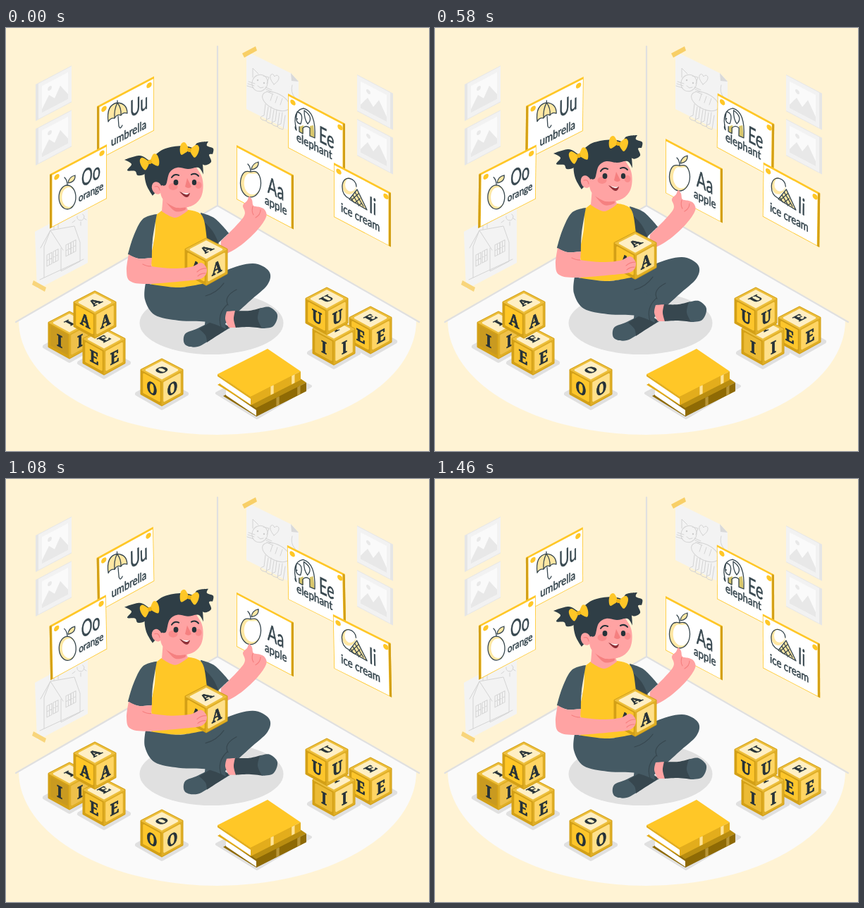
Recreate the animation shown at these times as an HTML page. Size 600 px wide and 600 px high, loop 1500 ms.

```html
<!DOCTYPE html>
<html lang="en">
<head>
<meta charset="utf-8">
<title>Learning letters</title>
<style>
html, body { margin: 0; width: 100%; height: 100%; overflow: hidden; background: #fff3d4; }
svg { display: block; width: 100vw; height: 100vh; }
.label { font-family: Lato, "Open Sans", sans-serif; fill: #37474f; stroke: #37474f; stroke-width: .6; }
.slab { font-family: "Noto Serif", "Liberation Serif", serif; font-weight: 800; text-anchor: middle;
  fill: #263238; stroke: #263238; stroke-width: .9; }
.ink, .faint, .fold { fill: none; stroke-linecap: round; stroke-linejoin: round; }
.ink { stroke: #37474f; stroke-width: 1.3; }
.faint { stroke: #d4d4d4; stroke-width: 1; }
.fold { stroke: #f58080; stroke-width: 1.2; }
</style>
</head>
<body>
<svg id="stage" viewBox="0 0 600 600" xmlns="http://www.w3.org/2000/svg"></svg>
<script>
const YELLOW = '#ffc727', GOLD = '#d3a017', CREAM = '#ffe7a3', NAVY = '#455a64', DARK = '#37474f',
      HAIR = '#2f3e46', SKIN = '#ffa3a3', BLUSH = '#f58080', SHADE = '#e0e0e0', PAPER = '#f3f3f3';
const SLOPE = 0.525, LOOP = 1500;

const path = (d, fill, extra = '') => `<path d="${d}" fill="${fill}" ${extra}/>`;
const line = (d, cls = 'ink', extra = '') => `<path d="${d}" class="${cls}" ${extra}/>`;
const oval = (x, y, rx, ry, fill, turn = 0) =>
  `<ellipse rx="${rx}" ry="${ry}" fill="${fill}" transform="translate(${x} ${y}) rotate(${turn})"/>`;
const dot = (x, y, r, fill) => oval(x, y, r, r, fill);
const rect = (x, y, w, h, fill) => `<rect x="${x}" y="${y}" width="${w}" height="${h}" fill="${fill}"/>`;
const poly = (points, fill, round = 0) =>
  `<polygon points="${points.join(' ')}" fill="${fill}" stroke="${fill}" stroke-width="${round}" stroke-linejoin="round"/>`;
const add = (...v) => [0, 1].map(i => v.reduce((sum, p) => sum + p[i], 0));
const range = (n, f) => Array.from({ length: n }, (_, i) => f(i)).join('');
// side: -1 for the left wall, 1 for the right wall
const wall = (x, y, side, inner) => `<g transform="matrix(1 ${side * SLOPE} 0 1 ${x} ${y})">${inner}</g>`;

// closed smooth curve through points; "!" marks a corner
function smooth(text) {
  const pts = text.split(' ').map(s => ({ p: s.replace('!', '').split(',').map(Number), corner: s.endsWith('!') }));
  const n = pts.length, at = i => pts[(i + n) % n];
  const handle = (i, dir) => at(i).p.map((v, k) =>
    (v + (at(i).corner ? 0 : dir * (at(i + 1).p[k] - at(i - 1).p[k]) / 6)).toFixed(1));
  return 'M' + pts[0].p + pts.map((_, i) => `C${handle(i, 1)} ${handle(i + 1, -1)} ${at(i + 1).p}`).join('') + 'Z';
}
const blob = (text, fill, extra) => path(smooth(text), fill, extra);

function label(text, x, y, side, size, narrow) {
  return `<text class="label" font-size="${size}" transform="matrix(${narrow} ${side * SLOPE * narrow} 0 1 ${x} ${y})">${text}</text>`;
}
const initials = (text, x, y, side) => label(text, x, y, side, 32, 0.62);
const word = (text, x, y, side, size = 17) => label(text, x, y, side, size, 0.78);

function card(id, x, y, side, pins, inner) {
  const left = side < 0;
  const board = rect(0, 0, 81, 77, YELLOW) + rect(left ? 0 : 78, 1, 3, 76, GOLD) +
    rect(left ? 3.5 : 0.8, 3, 76.7, 73.2, '#fff') +
    (pins ? dot(left ? 10 : 7, 9, 3.7, YELLOW) + dot(74, 9, 3.7, YELLOW) : '');
  return `<g id="${id}">${wall(x, y, side, board)}${inner}</g>`;
}

function photo(x, y, side) {
  const o = side < 0 ? 4 : 0;
  return wall(x, y, side, rect(0, 0, 51, 52, '#e6e6e6') + rect(o, 1, 47, 50, '#f2f2f2') +
    rect(o + 5, 7, 37, 38, '#fafafa') +
    path(`M${o + 5} 45V40l10-15 8 9 8-14 11 18v7Z`, '#e8e8e8') + dot(o + 16, 16, 3, '#e8e8e8'));
}

function face(points, edge, fill) {
  const mid = [0, 1].map(k => points.reduce((s, p) => s + p[k], 0) / 4);
  const inner = points.map(p => p.map((v, k) => mid[k] + (v - mid[k]) * 0.76));
  return poly(points, edge, 1) + poly(inner, fill, 2.5);
}

// x, y: the corner where the three visible faces meet
function cube(x, y, ch, left = '#fdc62c', right = '#ffe08a') {
  const H = 34, near = [x, y], west = [x - 29, y - 16], east = [x + 29, y - 16], far = [x, y - 31];
  const low = p => add(p, [0, H]);
  const glyph = (matrix, gx, gy, size) =>
    `<text class="slab" font-size="${size}" y="${size * 0.36}" transform="matrix(${matrix} ${gx} ${gy})">${ch}</text>`;
  return poly([west, far, east, low(east), low(near), low(west)], GOLD, 3) +
    face([west, near, low(near), low(west)], GOLD, left) +
    face([near, east, low(east), low(near)], '#dfae26', right) +
    face([west, far, east, near], '#edbf3c', '#ffefc4') +
    glyph('.82 .43 0 1', x - 14, y + 10, 23) + glyph('.82 -.43 0 1', x + 15, y + 10, 23) +
    glyph('.85 -.45 .7 .37', x, y - 16, 20);
}
const cubeShade = (x, y) => poly([[x - 35, y + 18], [x, y - 1], [x + 35, y + 18], [x, y + 38]], SHADE, 6);

function room() {
  return rect(0, 0, 600, 600, '#fff3d4') + path('M300 252L18 415A282 162 0 0 0 582 415Z', '#fafafa') +
    line('M300 26V252M14 417L300 252 586 417', 'faint', `style="stroke:${SHADE};stroke-width:2.2"`) +
    [0, 63].map(dy => photo(42, 80 + dy, -1) + photo(498, 66 + dy, 1)).join('') + catSketch() + houseSketch();
}

function catSketch() {
  const hoop = (x, y, rx, ry, turn) => `<ellipse class="faint" rx="${rx}" ry="${ry}" transform="translate(${x} ${y}) rotate(${turn})"/>`;
  return path('M341 33L404 64 415 76V152L341 115Z', PAPER) + path('M404 64L415 76 405 75Z', '#d9d9d9') +
    hoop(360, 78, 11, 12, 25) + hoop(383, 104, 21, 11, 27) +
    range(4, i => line(`M${368 + i * 8} ${108 + i * 4}l-2 16q-8 2 -3 6l6 2 3-20`, 'faint')) +
    range(3, i => line(`M${378 + i * 7} ${94 + i * 3}l-3 9M${353 - i} ${79 + i * 3}l-9 -3M${368 + i} ${84 + i * 3}l9 4`, 'faint')) +
    line('M350 70V57l8 8M365 68l8 2 -3 9M357 82l4 3 4-1M402 110q12 0 8-11 -7-8 -4-18M380 80q-8-10 -4-14 3-2 5 3 3-4 6 0 1 6-7 11', 'faint') +
    dot(357, 74, 1.2, '#ccc') + dot(366, 78, 1.2, '#ccc') + path('M335 36L354 26 356 32 338 42Z', '#f8cf67');
}

function houseSketch() {
  const pane = x => line(`M${x} 0h7v16h-7ZM${x + 3.5} 0v16M${x} 8h7`, 'faint');
  return path('M41 289L116 248V333L44 371Z', PAPER) +
    line('M54 354V310L63 287 97 281 105 304V331L78 345V312M49 312L63 287 81 315M68 286V276L74 273V284M48 357L110 328', 'faint') +
    wall(58, 322, -1, [0, 9, 27, 34].map(pane).join('')) +
    line('M101 267A5 5 0 1 0 109 264M98 273l-4 3M106 275v5M111 270l3 2', 'faint') +
    path('M39 358L57 368 55 374 37 364Z', '#f8d57c');
}

// dent pushes the top of the outline inwards
function fruit(x, y, rx, ry, dent) {
  const ring = (cx, k) => smooth(Array.from({ length: 18 }, (_, i) => {
    const a = i / 18 * 2 * Math.PI, c = Math.cos(a);
    return [cx + k * rx * Math.sin(a), y - k * ry * (c - dent * Math.max(0, c) ** 9)].map(v => v.toFixed(1)).join();
  }).join(' '));
  const top = y - ry * (1 - dent);
  return path(ring(x, 1), CREAM) + path(ring(x + rx * 0.18, 0.82), '#fff') + line(ring(x, 1)) +
    path(`M${x + 1} ${top - 3}q1-9 10-11 1 9-10 11`, CREAM, 'class="leaf" stroke="#37474f" stroke-width="1.2"') +
    line(`M${x} ${top}q0-7 -4-11`);
}

function umbrella() {
  const dome = 'M145 133Q142 109 158 106 172 107 172 121q-6-2 -9 3 -5-3 -9 4 -6-1 -9 5Z';
  return path(dome, CREAM) + line(dome + 'M158 106v-3M158 106q-5 10 -4 22M158 106q6 8 5 18M159 125l1 14q2 6 5-1');
}

function elephant() {
  return path('M431 139V153L438 156 436 138ZM416 140L422 138V150L416 147Z', '#d8c66b') +
    line('M412 145Q405 117 422 114 440 119 438 156l-7-3V142q-5-5 -10 0v8l-5-3V140M413 119q10 2 5 17 -9 -1 -5-17M423 117q14 10 5 19 -5 -6 -5-19M412 145q-3-3 -1-7') +
    dot(413, 129, 1, DARK);
}

function iceCream() {
  return oval(487, 224, 10, 12, CREAM) + oval(489, 222, 8, 10, '#fff') + path('M498 229L487 243 512 258Z', CREAM) +
    line('M487 242q-11-5 -10-19c2-16 20-10 20 2M498 229L487 243 512 258Z') +
    range(3, i => line(`M${490 + i * 5} ${244 + i * 4}l${10 - i * 3} ${-9 + i * 3}M${495 - i * 3} ${233 + i * 4}l${12 - i * 4} ${20 - i * 7}`));
}

function signs() {
  return card('uu', 129, 111, -1, true, umbrella() + initials('Uu', 176, 127, -1) + word('umbrella', 149, 168, -1)) +
    card('oo', 62, 207.5, -1, true, fruit(87, 240, 12, 17, 0) + initials('Oo', 107, 226, -1) + word('orange', 103, 247, -1, 15)) +
    card('ee', 400, 93, 1, true, elephant() + initials('Ee', 444, 161, 1) + word('elephant', 412, 160, 1)) +
    card('ii', 465, 191, 1, true, iceCream() + initials('Ii', 515, 261, 1) + word('ice cream', 475, 260, 1));
}
const appleSign = () => card('aa', 327, 166, 1, false,
  fruit(347, 220, 14.5, 20, 0.2) + initials('Aa', 371, 233, 1) + word('apple', 367, 249, 1));

function bow(x, y, turn) {
  const lobe = blob('0,0! -8,-9 -13,-6 -13,3 -9,9', YELLOW);
  return `<g transform="translate(${x} ${y}) rotate(${turn})">${lobe}<g transform="scale(-1 1)">${lobe}</g>${dot(0, 0, 3, '#f0b414')}</g>`;
}

function legs() {
  return blob('276,366! 312,344 350,334 373,345 371,364 345,388 306,424! 280,438! 285,395!', NAVY) +
    blob('300,412! 272,426 254,434 254,449 272,452 295,439 318,425!', NAVY) +
    blob('292,416! 318,424! 285,446! 283,436 274,427!', DARK) +
    blob('198,362! 197,385 211,407 245,415 285,417 312,427! 310,408 315,393! 297,384! 290,360! 245,368', NAVY) +
    line('M283 380q16-4 26-18M315 393q-7-12 12-22M305 424q-6-18 9-32', 'ink', 'style="stroke-width:1.2"') +
    blob('313,402! 326,401! 326,425! 316,425! 311,413', SKIN) +
    blob('325,401! 345,401 362,397! 364,426! 345,424 326,425! 323,413', DARK) +
    blob('360,398! 374,396 385,407 379,423 363,426! 357,412', NAVY);
}

function torso() {
  return blob('276,262! 296,270 316,291! 300,306! 282,304!', NAVY) + blob('278,272! 293,288 302,306! 284,303!', DARK) +
    blob('221,259! 240,268 258,258! 278,266 285,300 289,350! 282,362 245,368 206,365! 207,345 205,325! 211,295 212,266!', YELLOW) +
    blob('223,236! 254,246! 258,259! 240,269 221,260!', SKIN) + blob('227,247! 242,255 254,252! 254,258 240,260', BLUSH) +
    blob('214,264! 194,271 181,295 173,321! 188,327 207,326! 208,300', NAVY);
}

function farArm() {
  return blob('305,302! 337,268 336,252 342,245 345,239 349,244 351,252 360,254 367,258 369,268 357,286 336,306 313,320 304,318!', SKIN) +
    line('M350 253q-2 8 1 12M361 258q0 7 -7 11', 'fold');
}

function nearArm() {
  return blob('174,321! 171,344 176,359 200,363 252,359 278,355 285,343 277,333 262,339 235,341 206,338! 207,326! 188,327', SKIN) +
    line('M284 341q-8 0 -13 5M283 348q-7 0 -11 4M206 338q-7 0 -12-3', 'fold');
}

function head() {
  return blob('205,190! 190,181 168,187! 178,193 172,202 183,203 187,209 198,206', HAIR) +
    blob('267,178! 270,164 287,161! 285,167 294,171 293,179! 288,180 291,190 280,194', HAIR) +
    blob('222,200! 264,190! 278,212 278,236 266,251 244,255 226,246 219,232', SKIN) +
    blob('208,238! 199,222 197,203 206,186 226,171 258,168 276,181 280,208! 273,198 258,200 243,198 232,205 227,222 221,223!', HAIR) +
    oval(214, 227, 7, 9, SKIN, -20) + line('M211 225q6-2 7 5', 'fold') +
    oval(237, 225, 6.5, 5, '#f98c8c') + oval(273, 223, 4.5, 5, '#f98c8c') +
    oval(241, 219, 3.4, 4, '#263238') + oval(267, 219, 3.2, 4, '#263238') +
    line('M235 212q4-6 10-3M263 208q6-3 10 2', 'ink', 'style="stroke:#263238;stroke-width:2"') +
    path('M257 213l6 12q-4 4 -9 0Z', BLUSH) +
    path('M246 232q7 4 15 2 -3 13 -15-2', '#8f3037') + path('M249 233q6 2 11 1 -4 5 -11-1', '#fff') +
    bow(204, 190, -18) + bow(260, 173, 12);
}

// x, y: west corner of the cover
function book(x, y, cover, spine, band) {
  const west = [x, y], along = [71, -36], across = [47, 32], south = add(west, across), down = h => [0, h];
  const strip = (from, to) => {
    const p = k => add(south, along.map(v => v * k));
    return [p(from), p(to), add(p(to), down(12)), add(p(from), down(12))];
  };
  return poly([add(west, down(15)), add(west, along, down(15)), add(south, along, down(12)), add(south, down(12))], spine) +
    poly([add(west, [4, 3]), south, add(south, down(11)), add(west, [4, 14])], '#fff') +
    poly([west, add(west, along), add(south, along), south], cover) +
    poly([west, south, add(south, down(3)), add(west, down(3))], spine) + poly(strip(0, 1), spine) +
    [0.4, 0.82].map(k => poly(strip(k, k + 0.06), band)).join('');
}

function toys() {
  const warm = '#ffd564';
  const cubes = [[90, 434, 'I', '#c99a20', '#eec04a'], [139, 457, 'E', '#f7c332', warm], [126, 405, 'A', YELLOW, warm],
    [221, 501, 'O'], [517, 427, 'E', '#fdc62c', warm], [465, 443, 'I', '#ecbb35'], [455, 400, 'U', '#fdc62c', warm]];
  const onFloor = cubes.filter(c => c[1] > 406);
  return onFloor.map(c => cubeShade(c[0], c[1])).join('') + cubes.map(c => cube(...c)).join('') +
    poly([[299, 518], [372, 480], [432, 508], [356, 553]], SHADE, 4) +
    book(308, 507, '#b98d10', '#8e6a05', '#b99637') + book(300, 491, YELLOW, '#e3ad1c', '#ffe397');
}

const stage = document.getElementById('stage');
stage.innerHTML = room() + signs() + oval(291.5, 418.5, 102, 44.5, SHADE) +
  `<g id="lift">${appleSign()}${farArm()}${torso()}${legs()}${head()}${cube(284, 330, 'A')}${nearArm()}</g>` + toys();

const part = id => document.getElementById(id);
const lift = part('lift');
const swings = [['uu', 170, 128], ['oo', 103, 226], ['ee', 440, 153], ['ii', 506, 251]]
  .map(([id, x, y]) => ({ el: part(id), x, y }));

function draw(time) {
  const phase = (time % LOOP) / LOOP * 2 * Math.PI;
  const rise = 4.9 * (1 - Math.cos(phase + 0.1));
  const sway = 1.15 * Math.sin(phase);
  lift.setAttribute('transform', `translate(0 ${-rise.toFixed(3)})`);
  for (const s of swings) s.el.setAttribute('transform', `rotate(${sway.toFixed(3)} ${s.x} ${s.y})`);
}

function tick() {
  draw(performance.now());
  requestAnimationFrame(tick);
}
tick();
</script>
</body>
</html>
```
